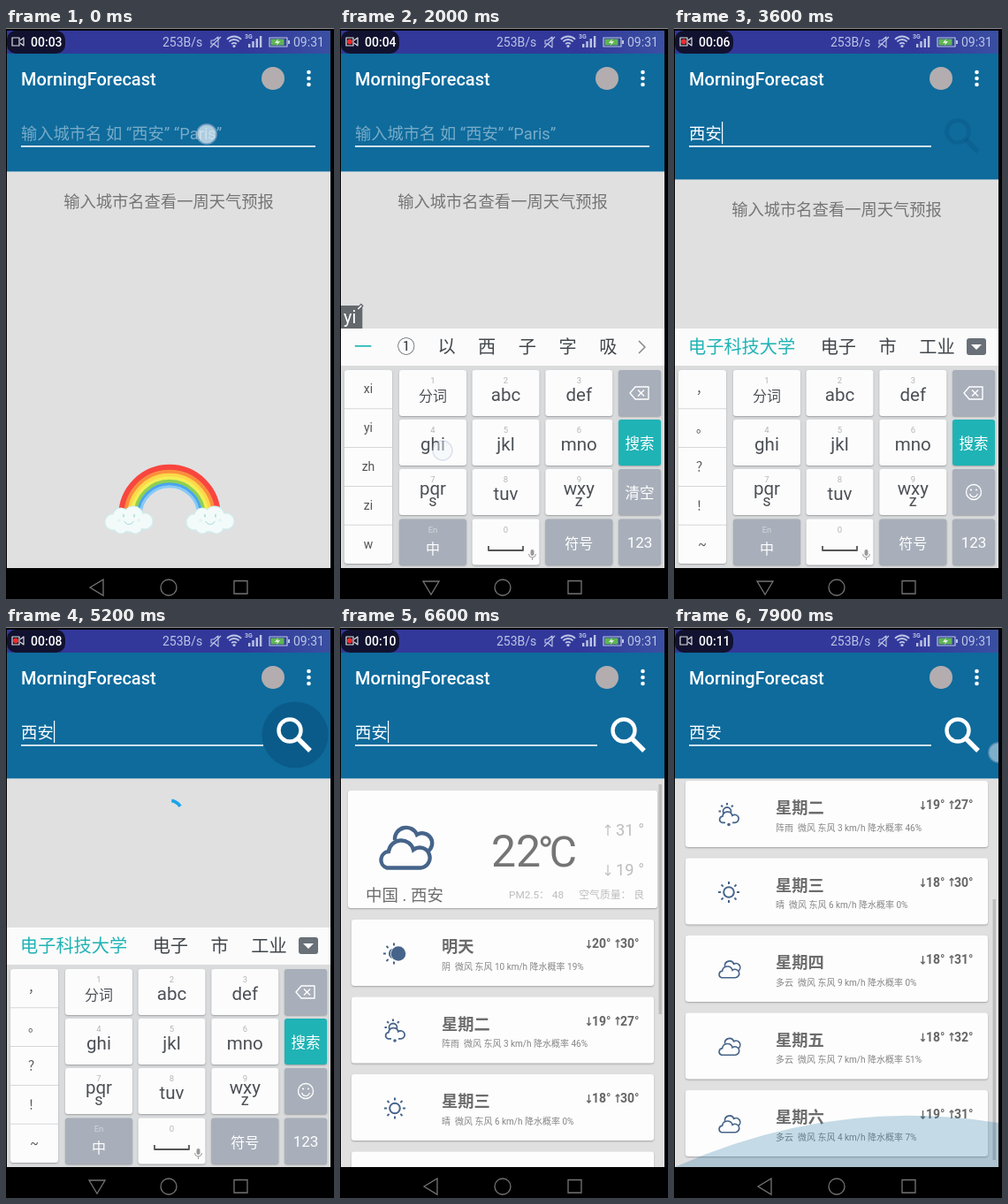
Animation, 371 px wide and 646 px high, one loop 8000 ms. Source, as an HTML page with a canvas:

```html
<!DOCTYPE html>
<html lang="zh-CN">
<head>
<meta charset="utf-8">
<title>Weather app</title>
<style>
html, body { margin: 0; width: 100%; height: 100%; overflow: hidden; background: #000; }
canvas { display: block; width: 371px; height: 646px; }
</style>
</head>
<body>
<canvas id="stage"></canvas>
<script>
const LOOP = 8000, INK = '#46648a', GREY = '#757575', TEAL = '#1fb3b5', PAPER = '#fdfdfd';
const canvas = document.getElementById('stage');
const ctx = canvas.getContext('2d');
const dpr = window.devicePixelRatio || 1;
canvas.width = 371 * dpr;
canvas.height = 646 * dpr;

// ---- Timing helpers ----
function key(t, ...points) {
  if (t <= points[0][0]) return points[0][1];
  for (let i = 1; i < points.length; i++) {
    const [a, from] = points[i - 1], [b, to] = points[i];
    if (t < b) return from + (to - from) * (t - a) / (b - a);
  }
  return points[points.length - 1][1];
}
const smooth = p => p * p * (3 - 2 * p);

// ---- Drawing helpers ----
function text(str, x, y, size, color, { weight = 400, align = 'left' } = {}) {
  ctx.font = `${weight} ${size}px Roboto, "Noto Sans CJK SC", "Noto Sans CJK", sans-serif`;
  ctx.fillStyle = color;
  ctx.textAlign = align;
  ctx.fillText(str, x, y);
  return ctx.measureText(str).width;
}
const label = (str, x, y, size, color) => text(str, x, y, size, color, { align: 'center' });
function rect(x, y, w, h, color, r = 0) {
  ctx.fillStyle = color;
  ctx.beginPath();
  ctx.roundRect(x, y, w, h, r);
  ctx.fill();
}
function disc(x, y, r, color) {
  ctx.fillStyle = color;
  ctx.beginPath();
  ctx.arc(x, y, r, 0, 7);
  ctx.fill();
}
function arc(x, y, r, color, width, from = 0, to = 2 * Math.PI) {
  ctx.strokeStyle = color;
  ctx.lineWidth = width;
  ctx.beginPath();
  ctx.arc(x, y, r, from, to);
  ctx.stroke();
}
function line(color, width, points, close) {
  ctx.strokeStyle = color;
  ctx.lineWidth = width;
  ctx.beginPath();
  points.forEach(([x, y]) => ctx.lineTo(x, y));
  if (close) ctx.closePath();
  ctx.stroke();
}
function polygon(color, points) {
  ctx.fillStyle = color;
  ctx.beginPath();
  points.forEach(([x, y]) => ctx.lineTo(x, y));
  ctx.fill();
}
function outline(path, width) {
  ctx.fillStyle = PAPER;
  ctx.fill(path);
  ctx.strokeStyle = INK;
  ctx.lineWidth = width;
  ctx.stroke(path);
}
function arrow(x, y, h, up, color, width) {
  const d = up ? -1 : 1, tip = y + d * h / 2, w = h * .25;
  line(color, width, [[x, y - d * h / 2], [x, tip]]);
  line(color, width, [[x - w, tip - d * w], [x, tip], [x + w, tip - d * w]]);
}
function shadowed(draw) {
  ctx.save();
  ctx.shadowColor = 'rgba(0,0,0,.28)';
  ctx.shadowBlur = 2 * dpr;
  ctx.shadowOffsetY = dpr;
  draw();
  ctx.restore();
}
function at(x, y, k, draw) {
  ctx.save();
  ctx.translate(x, y);
  ctx.scale(k, k);
  draw();
  ctx.restore();
}

// ---- Status, header and navigation ----
const TICKS = [0, 1000, 2100, 3100, 4000, 4800, 5600, 6250, 7700];
function statusBar(t) {
  const n = TICKS.filter(k => k <= t).length - 1;
  const fresh = t - TICKS[n] < 300;
  const c = '#bcc4e4';
  const shade = ctx.createLinearGradient(270, 0, 367, 0);
  shade.addColorStop(0, '#32389a');
  shade.addColorStop(1, '#3a4fa2');
  rect(1, 3, 366, 26, shade);
  rect(1, 3, 66, 26, '#11122f', 10);
  ctx.lineJoin = 'round';
  line('#ddd', 1.2, [[7, 11], [15, 11], [15, 20], [7, 20]], true);
  line('#ddd', 1.2, [[16, 14], [20, 11], [20, 20], [16, 17]]);
  if (!fresh) disc(11, 15.5, 3, '#f02a2a');
  text('00:' + String(3 + n).padStart(2, '0'), 28, 21, 14, '#fff', { weight: 500 });
  text('253B/s', 177, 21, 14, c);
  line(c, 1.1, [[232, 14], [235, 14], [240, 10], [240, 22], [235, 18], [232, 18]], true);
  line(c, 1.2, [[231, 22], [243, 10]]);
  for (const r of [4, 8, 11.5]) arc(258, 21, r, c, 1.8, -2.35, -.79);
  disc(258, 20.5, 1.6, c);
  text('3G', 270, 12, 7, c, { weight: 700 });
  [4, 7, 10, 13].forEach((h, i) => rect(274 + i * 4.3, 22 - h, 2.4, h, c));
  ctx.strokeStyle = c;
  ctx.lineWidth = 1.2;
  ctx.strokeRect(298, 11, 20, 10);
  rect(319, 14, 2, 4, c);
  rect(299.5, 12.5, 15, 7, '#5fb554');
  polygon('#e6efe0', [[308, 12], [304, 17], [307, 17], [306, 20], [310, 15], [307, 15]]);
  text('09:31', 325, 21, 14, c);
}
function magnifier(color) {
  arc(321, 117, 12.5, color, 4.4);
  line(color, 5.4, [[330, 126], [344, 140]]);
}
function header(t, bottom) {
  rect(1, 29, 366, bottom - 29, '#0e6b9c');
  rect(1, bottom, 366, 1, '#8fb4c8');
  text('MorningForecast', 17, 65, 20, '#fff', { weight: 500 });
  disc(302, 57, 13, '#b3adaf');
  for (const y of [50, 57, 64]) disc(342.5, y, 2.3, '#fff');
  const entered = t >= 3100;
  rect(17, 133, entered ? 274 : 333, 1.7, '#e8f2f7');
  if (entered) text('西安', 17, 126, 18.4, '#fff');
  else text('输入城市名 如 “西安” “Paris”', 17, 126, 18.3, '#78abc8');
  const phase = t % 1000;
  if (t > 300 && phase >= 150 && phase < 650) rect(entered ? 54 : 17, 106, 1.2, 25, '#fff');
  if (t >= 3400) magnifier('rgba(0,50,90,.14)');
  const ripple = key(t, [4700, 0], [4950, .28], [5500, .28], [5900, 0]);
  if (ripple) disc(327, 122, key(t, [4700, 8], [5000, 37.5]), `rgba(0,50,90,${ripple})`);
  const shown = key(t, [3700, 0], [4000, 1]);
  if (shown) magnifier(`rgba(255,255,255,${shown})`);
}
function navigation(keyboardOpen) {
  const c = '#747474';
  rect(0, 611, 371, 35, '#000');
  line(c, 1.3, keyboardOpen ? [[94, 626], [112, 626], [103, 641]] : [[95, 633], [110, 624], [110, 642]], true);
  arc(184, 633, 9, c, 1.3);
  line(c, 1.3, [[258, 625.5], [273, 625.5], [273, 640], [258, 640]], true);
}

// ---- Start page ----
const PUFFS = [[-18, 2, 9], [-9, -5, 9], [5, -5, 11], [18, 1, 9], [-9, 7, 8], [7, 7, 8], [0, 3, 10]];
const BANDS = [['#f8463f', 6], ['#fb8f3c', 4], ['#fdd848', 3.5], ['#f5ee55', 3.5],
  ['#8ed052', 3.5], ['#4ba4ef', 3], ['#86caf6', 2.5]];
function rainbow() {
  let r = 57.5;
  for (const [color, width] of BANDS) {
    arc(185, 551.5, r - width / 2, color, width + .4, Math.PI, 2 * Math.PI);
    r -= width;
  }
  for (const x of [139, 231]) at(x, 557, 1, () => {
    for (const [px, py, pr] of PUFFS) disc(px, py, pr + .5, '#cdeff0');
    for (const [px, py, pr] of PUFFS) disc(px, py, pr - .5, '#f3fafa');
    for (const eye of [-6, 6]) rect(eye - .6, -7, 1.2, 3.5, '#8fd3d2', .6);
    arc(0, -1, 5.5, '#8fd3d2', .8, .35, 2.8);
    for (const cheek of [-11, 11]) disc(cheek, 0, 1.8, '#e0f4f4');
  });
}

// ---- Keyboard ----
const INPUT = [
  [0, '', [], '，。？！~'.split('')],
  [1550, 'w', ['我', '①', '为', '无', '五', '王', '晚'], ['w', 'x', 'y', 'z', '9']],
  [1900, 'yi', ['一', '①', '以', '西', '子', '字', '吸'], ['xi', 'yi', 'zh', 'zi', 'w']],
  [2300, 'xia', ['下', '①', '夏', '西', '吓', '系', '压'], ['xia', 'ya', 'zha', 'xi', 'yi']],
  [2650, 'xian', ['西安', '先', '现', '线', '县', '显'], ['xian', 'yan', 'zhan', 'xi', 'yi']],
  [3100, '', ['电子科技大学', '电子', '市', '工业'], '，。？！~'.split('')],
];
const KEY_ROWS = [
  [['1', '分词'], ['2', 'abc'], ['3', 'def']],
  [['4', 'ghi'], ['5', 'jkl'], ['6', 'mno']],
  [['7', 'pqr', 's'], ['8', 'tuv'], ['9', 'wxy', 'z']],
  [['En', '中'], ['0', ''], ['', '符号']],
];
const COLUMNS = [67, 149.5, 232.3, 315], ROWS = [387, 443, 499, 555.5];
function keycap(col, row, color) {
  shadowed(() => rect(COLUMNS[col], ROWS[row], col === 3 ? 48 : 76, 52, color, 3));
}
function keyboard(t) {
  const [, pinyin, candidates, side] = INPUT.filter(s => s[0] <= t).pop();
  const composing = pinyin !== '';
  if (composing) {
    ctx.font = '400 20px Roboto, sans-serif';
    rect(1, 314, ctx.measureText(pinyin).width + 10, 26, '#63686d');
    const w = text(pinyin, 4, 334, 20, '#fff');
    line('#63686d', 4, [[w + 5, 319], [w + 11, 313]]);
    line('#fff', 1.5, [[w + 6, 318], [w + 10, 314]]);
  }
  rect(1, 340, 366, 42, '#fbfbfb');
  rect(1, 382, 366, 229, '#d9dbdd');
  let x = 16;
  candidates.forEach((word, i) => {
    x += text(word, x, 368, 20.2, i ? '#41464b' : TEAL, { weight: i ? 400 : 500 }) + (i ? 25.5 : 28.5);
  });
  if (composing) line('#888', 1.5, [[338, 354], [345, 361], [338, 368]]);
  else {
    rect(331, 351, 22, 19, '#697078', 3);
    polygon('#fff', [[336, 358], [348, 358], [342, 364]]);
  }

  shadowed(() => rect(5, 387, 54, 219, '#fcfcfc', 3));
  side.forEach((s, i) => {
    if (i) rect(5, 386.5 + i * 43.8, 54, 1, '#d5d7d9');
    label(s, 32, 413 + i * 44, 14, '#555');
  });

  KEY_ROWS.forEach((keys, row) => keys.forEach(([hint, main, below], col) => {
    const grey = row === 3 && col !== 1, cx = COLUMNS[col] + 38, y = ROWS[row];
    keycap(col, row, grey ? '#a8afba' : '#fcfcfc');
    label(hint, cx, y + 15, 9.5, grey ? '#d2d6dc' : '#b2b5b8');
    if (grey) label(main, cx, y + (col ? 33 : 39), 16, '#fff');
    else label(main, cx, y + (main === '分词' ? 35 : below ? 29 : 35), main === '分词' ? 16 : 20.5, '#4c5056');
    if (below) label(below, cx, y + 42, 18, '#4c5056');
  }));
  line('#555', 1.8, [[168, 586], [168, 591], [207, 591], [207, 586]]);
  rect(215.5, 590, 4, 7, '#999', 2);
  arc(217.5, 595, 4, '#999', 1, 0, Math.PI);
  line('#999', 1, [[217.5, 599], [217.5, 602]]);

  for (let row = 0; row < 4; row++) keycap(3, row, row === 1 ? TEAL : '#a8afba');
  line('#fff', 1.4, [[328, 413], [334, 406], [349, 406], [349, 420], [334, 420]], true);
  line('#fff', 1.4, [[337, 409.5], [344, 416.5]]);
  line('#fff', 1.4, [[344, 409.5], [337, 416.5]]);
  label('搜索', 339, 476, 16.5, '#fff');
  if (composing) label('清空', 339, 532, 16.5, '#fff');
  else {
    arc(339, 525, 8.5, '#fff', 1.3);
    arc(339, 526, 4.5, '#fff', 1.2, .2, 2.94);
    for (const e of [336, 342]) disc(e, 522.5, 1.1, '#fff');
  }
  label('123', 339, 588, 17, '#fff');
}

// ---- Forecast ----
const BACK_CLOUD = new Path2D('M-11 -9A13 13 0 0 1 14 -15A10.5 10.5 0 0 1 26 4');
const FRONT_CLOUD = new Path2D(
  'M-20 22.5A9.5 9.5 0 0 1 -18 4A14.3 14.3 0 0 1 10 2A11.5 11.5 0 1 1 18 22.5Z');
function rays(x, y, from, to, first = 0, last = 7) {
  for (let i = first; i <= last; i++) {
    const c = Math.cos(i * Math.PI / 4), s = Math.sin(i * Math.PI / 4);
    line(INK, 2, [[x + c * from, y + s * from], [x + c * to, y + s * to]]);
  }
}
const ICONS = {
  cloudy(width) {
    outline(BACK_CLOUD, width);
    outline(FRONT_CLOUD, width);
  },
  sunny() {
    arc(0, 0, 5.8, INK, 2);
    rays(0, 0, 9, 12);
  },
  overcast() {
    rays(-1, 0, 9, 12, 2, 6);
    disc(-1, 0, 6, INK);
    disc(4, 0, 9, PAPER);
    disc(4, 0, 8.3, INK);
  },
  showers() {
    rays(-2, -4, 7, 9.5, 4, 7);
    arc(-2, -4, 4.5, INK, 1.8);
    at(0, 0, .39, () => outline(FRONT_CLOUD, 4.4));
    rect(-4, 7, 8, 4, PAPER);
    disc(0, 11, 1.8, INK);
  },
};
const DAYS = [
  ['明天', 'overcast', 20, 30, '阴  微风 东风 10 km/h 降水概率 19%'],
  ['星期二', 'showers', 19, 27, '阵雨  微风 东风 3 km/h 降水概率 46%'],
  ['星期三', 'sunny', 18, 30, '晴  微风 东风 6 km/h 降水概率 0%'],
  ['星期四', 'cloudy', 18, 31, '多云  微风 东风 9 km/h 降水概率 0%'],
  ['星期五', 'cloudy', 18, 32, '多云  微风 东风 7 km/h 降水概率 51%'],
  ['星期六', 'cloudy', 19, 31, '多云  微风 东风 4 km/h 降水概率 7%'],
];
const card = (x, y, w, h) => shadowed(() => rect(x, y, w, h, PAPER, 3));
function today() {
  card(9, 185, 350, 133);
  at(73, 250, 1, () => ICONS.cloudy(4.4));
  text('中国 . 西安', 29, 310, 18.5, '#6c6c6c');
  const w = text('22', 171, 271, 50, GREY);
  text('℃', 169.5 + w, 271, 48, GREY);
  [[31, 236, true], [19, 281, false]].forEach(([degrees, y, up]) => {
    arrow(303, y - 6, 12, up, '#bdbdbd', 1.2);
    text(degrees + ' °', 344, y, 18.3, '#bdbdbd', { align: 'right' });
  });
  text('PM2.5： 48', 191, 307, 11.8, '#bdbdbd');
  text('空气质量： 良', 344, 307, 11.8, '#bdbdbd', { align: 'right' });
}
function day([name, icon, low, high, detail], y) {
  card(13, y, 342, 75);
  at(62, y + 38.5, icon === 'cloudy' ? .41 : 1, () => ICONS[icon](4));
  text(name, 115, y + 37, 18.3, '#6c6c6c', { weight: 700 });
  text(detail, 115, y + 56.5, 10, '#858585');
  const bold = { weight: 700 };
  arrow(281.5, y + 27.5, 9, false, '#666', 1.4);
  text(low + '°', 285, y + 32, 14, '#666', bold);
  arrow(314, y + 27.5, 9, true, '#666', 1.4);
  text(high + '°', 338.5, y + 32, 14, '#666', { ...bold, align: 'right' });
}
function forecast(t) {
  const scroll = key(t, [6950, 0], [7400, 148], [7650, 244.5]);
  at(0, -scroll, 1, () => {
    today();
    DAYS.forEach((d, i) => day(d, 331 + 87.5 * i));
  });
  const top = key(scroll, [0, 178], [148, 273], [244.5, 308]);
  const length = key(scroll, [0, 260], [148, 262], [244.5, 295]);
  rect(360.5, top, 3.5, length, 'rgba(120,120,120,.35)');
  const pull = key(t, [7650, 0], [7900, 1]);
  if (pull) {
    ctx.fillStyle = `rgba(14,107,156,${.24 * pull})`;
    ctx.beginPath();
    ctx.moveTo(1, 611);
    ctx.quadraticCurveTo(180, 611 - 80 * pull, 367, 611 - 50 * pull);
    ctx.lineTo(367, 611);
    ctx.fill();
  }
}
function spinner(t) {
  const head = -.62 + (t - 5200) * .0065;
  const sweep = .75 + 1.6 * (.5 - .5 * Math.cos((t - 5200) / 210));
  arc(184, 212, 16, '#1ba5ea', 3.8, head - sweep, head);
}

// ---- Touches ----
const TAPS = [[-50, 227, 120], [1480, 270, 525], [1840, 116, 478], [2230, 187, 413],
  [2580, 270, 470], [3020, 30, 361], [4680, 327, 122]];
function touch(x, y, alpha) {
  ctx.save();
  ctx.globalAlpha = alpha;
  disc(x, y, 12, 'rgba(255,255,255,.25)');
  disc(x, y, 10.5, 'rgba(235,243,250,.62)');
  arc(x, y, 11, 'rgba(140,160,195,.55)', 1.4);
  ctx.restore();
}
function touches(t) {
  for (const [start, x, y] of TAPS) {
    const age = t - start;
    if (age >= 0 && age < 230) touch(x, y, key(age, [80, 1], [230, .15]));
  }
  if (t >= 6900) touch(key(t, [7400, 313], [7900, 367]),
    key(t, [6950, 493], [7400, 345], [7650, 248], [7900, 142]), key(t, [7700, 1], [7900, .65]));
}

function clipped(x, y, w, h, draw) {
  ctx.save();
  ctx.beginPath();
  ctx.rect(x, y, w, h);
  ctx.clip();
  draw();
  ctx.restore();
}
function render(t) {
  ctx.setTransform(dpr, 0, 0, dpr, 0, 0);
  rect(0, 0, 371, 646, '#000');
  rect(0, 0, 371, 1, '#888');
  const bottom = t < 3100 ? 162 : 171;
  const raised = smooth(key(t, [400, 0], [650, 1], [5800, 1], [6050, 0]));
  clipped(1, 3, 366, 608, () => {
    clipped(1, bottom, 366, 611 - bottom, () => {
      rect(1, bottom, 366, 611 - bottom, '#e0e0e0');
      if (t < 4900) label('输入城市名查看一周天气预报', 184, bottom + 40.5, 18.3, GREY);
      else if (t < 6150) spinner(t);
      if (t < 6150) rainbow();
      else forecast(t);
    });
    statusBar(t);
    header(t, bottom);
    if (raised) at(0, 271 * (1 - raised), 1, () => keyboard(t));
    touches(t);
  });
  navigation(raised > .5);
}
function frame(now) {
  render(now % LOOP);
  requestAnimationFrame(frame);
}
requestAnimationFrame(frame);
</script>
</body>
</html>
```
